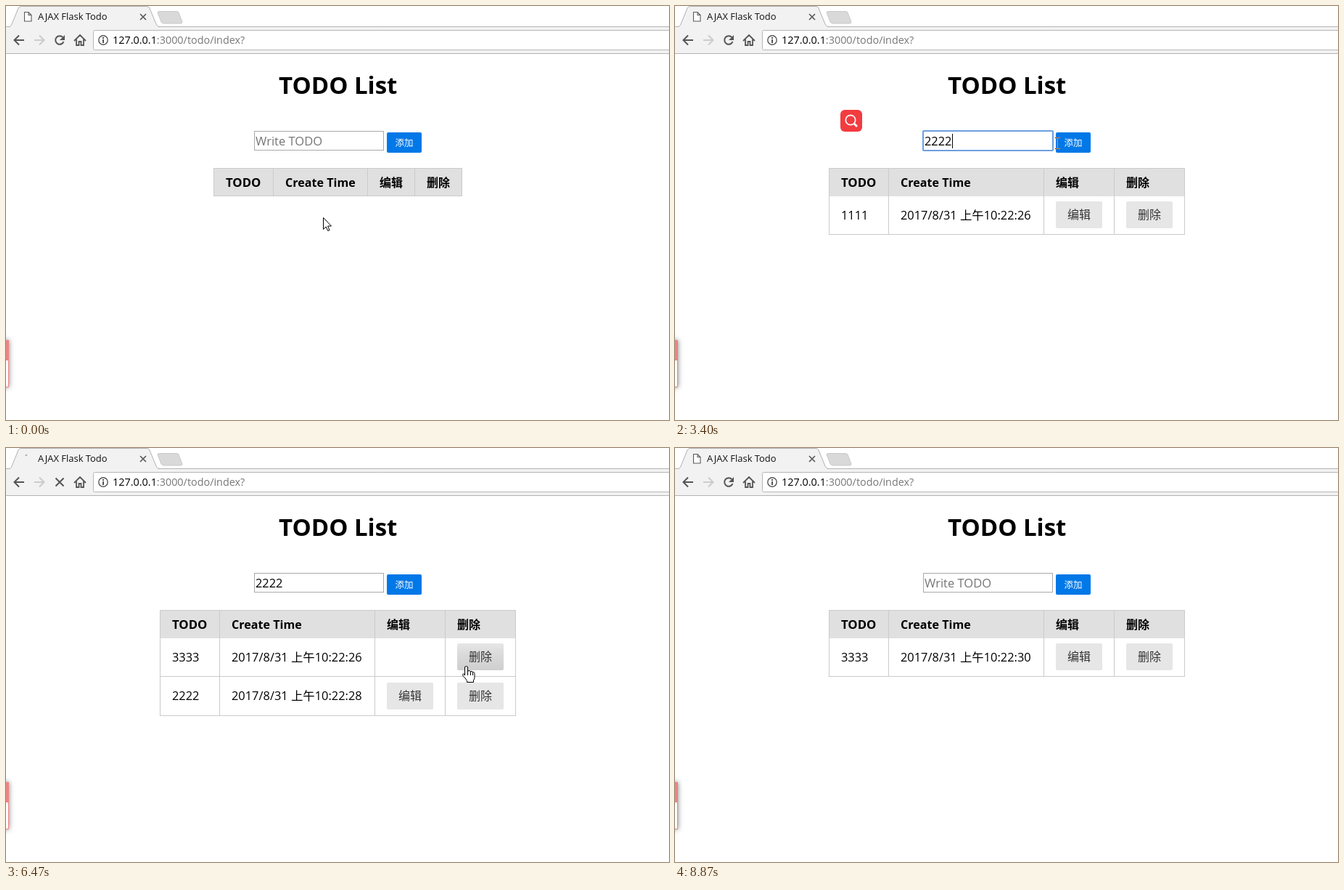
Write an HTML page with a canvas that moves like this. It is 914 px wide and 570 px high and loops after 9.67 s.

```html
<!DOCTYPE html>
<html lang="zh">
<head>
<meta charset="utf-8">
<title>TODO List</title>
<style>
html, body { margin: 0; width: 100%; height: 100%; overflow: hidden; background: #fff; }
canvas { display: block; }
</style>
</head>
<body>
<canvas id="stage" width="914" height="570"></canvas>
<script>
const ctx = document.getElementById('stage').getContext('2d');
const LOOP = 9670, TICK = 200 / 3;
const FONTS = '"Open Sans", "Noto Sans CJK SC", "Noto Sans CJK", "Noto Sans", sans-serif';
const LINE = '#cbcbcb';

// Pointer stops: time, x, y
const STOPS = [
  [0, 437, 291], [470, 428, 186], [1270, 428, 186], [1530, 550, 193],
  [1730, 550, 193], [2270, 412, 198], [3070, 412, 198], [3400, 527, 189],
  [3530, 550, 193], [3870, 550, 193], [4330, 555, 284], [4600, 555, 284],
  [4930, 558, 298], [5800, 558, 298], [6130, 650, 292], [6270, 650, 292],
  [6470, 635, 300], [7130, 635, 300], [7330, 620, 317], [7600, 638, 344],
  [8730, 638, 344], [8800, 525, 435], [LOOP, 525, 435]
];
const HIDDEN = [[800, 1330], [2730, 3130], [5470, 5800], [8870, LOOP]];
const PRESSED = [[1670, 1800], [3600, 3730], [4470, 4530], [6200, 6270], [7670, 7800]];
const INPUT_FOCUS = [[530, 1670], [2270, 3600]];
const ADD_FOCUS = [[1670, 2270], [3600, 4470]];

const ARROW = new Path2D('M.5 .5V16.5L4.2 13L6.7 18.5L9 17.6L6.6 12H11.5Z');
const HAND = new Path2D('M-2.5 13V2Q-2.500 .5 -.5 .5Q1.500 .5 1.500 2V8Q1.500 6.500 3.500 6.500' +
  'Q5.500 6.500 5.500 8.500Q5.500 7.500 7 7.500Q8.500 7.500 8.500 9.500Q8.500 8.500 10 8.500' +
  'Q11 9 11 11V15Q11 18 9.500 20V22.500H.5V20.500Q-1.500 17 -5 13.500Q-6 11.500 -4.500 10.800Q-3.500 10.800 -2.500 13Z');

let now = 0, mouse = { x: 0, y: 0 };

const during = spans => spans.some(([a, b]) => now >= a && now < b);
const typed = (digit, times) => digit.repeat(times.filter(t => now >= t).length);
const inside = (x, y, w, h) => mouse.x >= x && mouse.x < x + w && mouse.y >= y && mouse.y < y + h;

function rect(x, y, w, h, color) {
  ctx.fillStyle = color;
  ctx.fillRect(x, y, w, h);
}

function text(str, x, y, size, color = '#000', weight = 400, align = 'left') {
  ctx.font = `${weight} ${size}px ${FONTS}`;
  ctx.fillStyle = color;
  ctx.textAlign = align;
  ctx.fillText(str, x, y);
}

function path(d, stroke, width = 1, fill) {
  const p = d instanceof Path2D ? d : new Path2D(d);
  if (fill) { ctx.fillStyle = fill; ctx.fill(p); }
  if (stroke) { ctx.strokeStyle = stroke; ctx.lineWidth = width; ctx.stroke(p); }
}

function arc(x, y, r, color, width, from = 0, to = Math.PI * 2) {
  ctx.beginPath();
  ctx.arc(x, y, r, from, to);
  ctx.strokeStyle = color;
  ctx.lineWidth = width;
  ctx.stroke();
}

function roundBox(x, y, w, h, r, fill) {
  ctx.beginPath();
  ctx.roundRect(x, y, w, h, r);
  ctx.fillStyle = fill;
  ctx.fill();
}

function moveMouse() {
  const i = STOPS.findIndex(s => s[0] > now);
  const [t0, x0, y0] = STOPS[i - 1], [t1, x1, y1] = STOPS[i];
  const u = (now - t0) / (t1 - t0), e = u * u * (3 - 2 * u);
  mouse = { x: Math.round(x0 + (x1 - x0) * e), y: Math.round(y0 + (y1 - y0) * e), kind: 'arrow' };
}

function button(x, y, w, h, label, { bg = '#e6e6e6', fg = '#333', size = 16, focus = false } = {}) {
  const hover = inside(x, y, w, h) && mouse.kind !== 'beam';
  roundBox(x, y, w, h, 2, bg);
  if (hover) mouse.kind = 'hand';
  if (hover || focus) {
    const shade = ctx.createLinearGradient(0, y, 0, y + h);
    shade.addColorStop(0, 'rgba(0,0,0,0)');
    shade.addColorStop(.4, 'rgba(0,0,0,.05)');
    shade.addColorStop(1, 'rgba(0,0,0,.1)');
    roundBox(x, y, w, h, 2, shade);
  }
  if (hover && during(PRESSED)) {
    for (const [inset, alpha] of [[.5, .25], [1.5, .08], [2.5, .04]]) {
      ctx.strokeStyle = `rgba(0,0,0,${alpha})`;
      ctx.lineWidth = 1;
      ctx.strokeRect(x + inset, y + inset, w - 2 * inset, h - 2 * inset);
    }
  }
  text(label, x + w / 2, y + h / 2 + size * .37, size, fg, 400, 'center');
}

function browser() {
  const loading = now >= 6400 && now < 6800;
  rect(0, 28, 914, 38, '#f2f2f2');
  rect(0, 28, 914, 1, '#b4b4b4');
  rect(0, 65, 914, 1, '#b4b4b4');
  path('M4 29Q7 28 8 25L17 3Q18 .5 21 .5H194Q197 .5 198 3L207 25Q208 28 212 29', '#b0b0b0', 1, '#f2f2f2');
  rect(6, 28, 203, 1, '#f2f2f2');
  path('M211 7.500H235Q237 7.500 238 9L243 22Q243 24 241 24H218Q215 24 214 22L209 9Q209 7.500 211 7.500Z', '#c8c8c8', 1, '#d9d9d9');
  if (loading) {
    const end = -Math.PI * .55;
    arc(30, 15, 5.5, '#999', 1.5, end - .5 - (now - 6470) / 140, end);
  } else {
    path('M25.5 8.5h5.500l4 4v8.500h-9.500zM31 8.500v4h4', '#5a5a5a', 1.1, '#fff');
  }
  text('AJAX Flask Todo', 44, 19, 12.95, '#111');
  path('M185 11l8 8M193 11l-8 8', '#5a5a5a', 1.7);

  path('M25 47H12M18 40.500L11.500 47L18 53.500', '#555', 2);
  path('M39 47H52M46 40.500L52.500 47L46 53.500', '#ccc', 2);
  if (loading) {
    path('M68.500 41.500l11 11M79.500 41.500l-11 11', '#555', 2);
  } else {
    arc(74, 47, 5.8, '#555', 2, .35, 5.5);
    path('M81 40V47H74Z', null, 0, '#555');
  }
  path('M94 48L102 40L110 48M97 46V54H100.500V49H103.500V54H107V46', '#555', 1.8);

  ctx.beginPath();
  ctx.roundRect(120.5, 33.5, 820, 27, 2);
  ctx.fillStyle = '#fff';
  ctx.fill();
  ctx.strokeStyle = '#b6b6b6';
  ctx.lineWidth = 1;
  ctx.stroke();
  arc(134, 47, 6.2, '#555', 1.4);
  rect(133, 46, 2, 5, '#555');
  rect(133, 43, 2, 2, '#555');
  text('127.0.0.1', 147, 52, 14.4);
  text(':3000/todo/index?', 147 + ctx.measureText('127.0.0.1').width, 52, 14.4, '#777');
}

function sideTab() {
  ctx.save();
  ctx.shadowColor = 'rgba(0,0,0,.5)';
  ctx.shadowBlur = 7;
  rect(-20, 460, 24, 65, '#ec8583');
  ctx.restore();
  rect(0, 488, 3, 36, '#fff');
}

function addForm() {
  const focused = during(INPUT_FOCUS);
  if (focused) {
    roundBox(341, 171, 181, 29, 2, '#6d9fe0');
    rect(343, 173, 177, 25, '#fff');
  } else {
    rect(342, 172, 179, 27, '#a9a9a9');
    rect(343, 173, 177, 25, '#fff');
  }
  if (inside(341, 171, 187, 29)) mouse.kind = 'beam';

  let value = typed('1', [800, 1000, 1130, 1270]);
  if (now >= 2730) value = typed('2', [2730, 2870, 2930, 3070]);
  if (now >= 6730) value = '';
  const selected = now >= 2470 && now < 2730;
  if (selected) rect(344, 175, 38, 21, '#3297fd');
  if (value) text(value, 344, 192, 16.4, selected ? '#fff' : '#000');
  else text('Write TODO', 344, 192, 16.55, '#757575');
  if (focused && !selected) rect(Math.round(344 + value.length * 9.4), 176, 1, 20, '#000');

  button(525, 174, 48, 28, '添加', { bg: '#0078e7', fg: '#fff', size: 12.5, focus: during(ADD_FOCUS) });
}

function editForm(x) {
  const focused = now >= 4730 && now < 6200;
  const value = typed('3', [5470, 5530, 5600, 5730]);
  roundBox(x, 274, 196, 39, 4, focused ? '#129fea' : '#ccc');
  roundBox(x + 1, 275, 194, 37, 3, '#fff');
  if (!focused) rect(x + 3, 275, 190, 1, '#ddd');
  if (inside(x, 274, 196, 39)) mouse.kind = 'beam';
  text(value, x + 10, 299, 16.4);
  if (focused) rect(Math.round(x + 10 + value.length * 9.4), 283, 1, 20, '#000');
  button(x + 201, 275, 64, 37, '确定');
}

function table() {
  const editing = now >= 4530 && now < 6270;
  const rows = [];
  if (now >= 1730) rows.push({ todo: now < 6270 ? '1111' : '3333', second: now < 6730 ? 26 : 30, first: true });
  if (now >= 3670 && now < 7870) rows.push({ todo: '2222', second: 28 });

  const cols = !rows.length ? [286, 368, 498, 563, 628]
    : editing ? [112, 194, 408, 706, 803] : [212, 294, 508, 605, 702];
  const left = cols[0], width = cols[4] - left + 1;
  rect(left, 223, width, 39, '#e0e0e0');
  rect(left, 223, width, 1, LINE);
  const sizes = [16.75, 16.1, 16, 16];
  ['TODO', 'Create Time', '编辑', '删除'].forEach((label, i) =>
    text(label, cols[i] + 17, 249, sizes[i], '#000', 700));
  if (!rows.length) rect(left, 261, width, 1, LINE);

  let top = 262;
  for (const row of rows) {
    const bottom = top + (editing && row.first ? 73 : top === 262 ? 52 : 53);
    const mid = Math.floor((top + bottom) / 2);
    text(row.todo, cols[0] + 17, mid + 6, 16.4);
    text(`2017/8/31 上午10:22:${row.second}`, cols[1] + 17, mid + 6, 16.4);
    if (row.first && editing) editForm(cols[2] + 17);
    else if (!row.first || now < 4530 || now >= 6730) button(cols[2] + 17, mid - 19 + (mid > 340), 64, 37, '编辑');
    button(cols[3] + 17, mid - 19 + (mid > 340), 64, 37, '删除');
    rect(left, bottom, width, 1, LINE);
    top = bottom + 1;
  }
  for (const x of cols) rect(x, 223, 1, (rows.length ? top : 262) - 223, LINE);
}

function searchBadge() {
  if (now < 2530 || now >= 3600) return;
  ctx.globalAlpha = now < 2670 ? .5 : 1;
  roundBox(228, 143, 30, 30, 6, '#f23c40');
  arc(242, 157, 6.7, '#fff', 1.7);
  path('M247 162L251 166', '#fff', 3);
  ctx.globalAlpha = 1;
}

function pointer() {
  if (during(HIDDEN)) return;
  ctx.save();
  ctx.translate(mouse.x, mouse.y);
  if (mouse.kind === 'beam') {
    ctx.globalCompositeOperation = 'difference';
    rect(0, -7, 1, 14, '#fff');
    for (const y of [-8, 7]) {
      rect(-3, y, 3, 1, '#fff');
      rect(1, y, 3, 1, '#fff');
    }
  } else {
    path(mouse.kind === 'hand' ? HAND : ARROW, '#000', 1, '#fff');
    if (mouse.kind === 'hand') path('M1.500 8V13M5.500 8.500V13M8.500 9.500V13', '#000');
    if (now >= 7200 && now < 7470) {
      ctx.beginPath();
      ctx.arc(14.5, .5, 6, 0, 7);
      ctx.fillStyle = '#fff';
      ctx.fill();
      arc(14.5, .5, 5.7, '#2a93e8', 4);
    }
  }
  ctx.restore();
}

function draw() {
  const t = performance.now() % LOOP;
  now = Math.round(Math.floor((t + 3.4) / TICK) * TICK / 10) * 10 % LOOP;
  moveMouse();
  rect(0, 0, 914, 570, '#fff');
  browser();
  sideTab();
  text('TODO List', 376, 121, 33, '#000', 700);
  addForm();
  table();
  searchBadge();
  pointer();
  requestAnimationFrame(draw);
}
draw();
</script>
</body>
</html>
```
